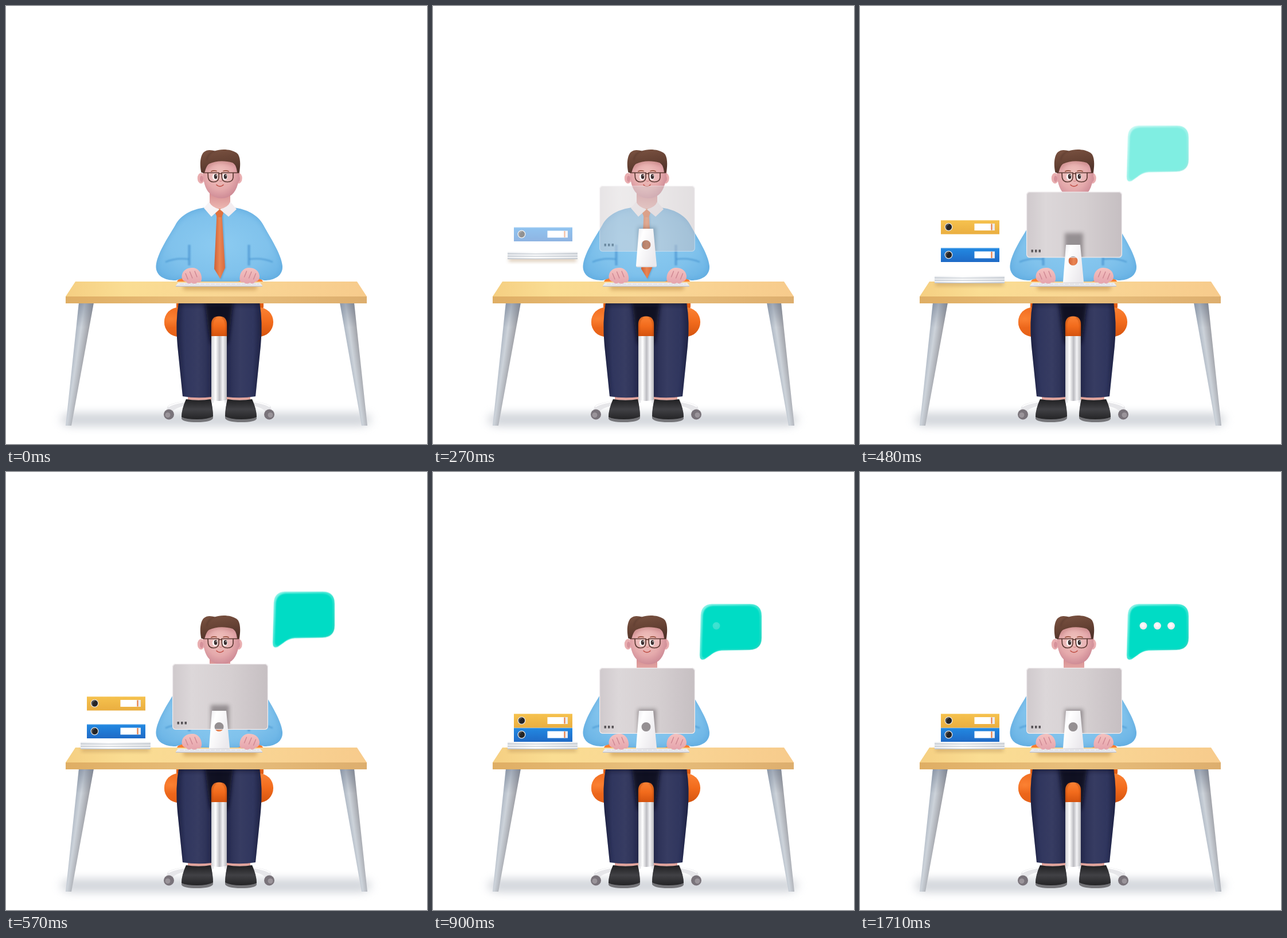
An HTML page that plays this animation: 734 by 763 pixels, repeating every 1740 ms.

```html
<!DOCTYPE html>
<html lang="en">
<head>
<meta charset="utf-8">
<title>Desk</title>
<style>
  html, body { margin: 0; width: 100%; height: 100%; overflow: hidden; background: #fff; }
  svg { display: block; width: 734px; height: 763px; }
  .show { opacity: 0; }
</style>
</head>
<body>
<svg viewBox="0 0 734 763" xmlns="http://www.w3.org/2000/svg">
  <defs>
    <filter id="b1" x="-50%" y="-50%" width="200%" height="200%"><feGaussianBlur stdDeviation="1.2"/></filter>
    <filter id="b3" x="-50%" y="-80%" width="200%" height="260%"><feGaussianBlur stdDeviation="3"/></filter>
    <filter id="b8" x="-20%" y="-150%" width="140%" height="400%"><feGaussianBlur stdDeviation="9 7"/></filter>

    <linearGradient id="wood"><stop offset="0" stop-color="#f5cf82"/><stop offset=".2" stop-color="#fadd93"/><stop offset=".6" stop-color="#f9d594"/><stop offset="1" stop-color="#f7cb8c"/></linearGradient>
    <linearGradient id="edge"><stop offset="0" stop-color="#dfae64"/><stop offset=".5" stop-color="#e8bf7c"/><stop offset="1" stop-color="#ddae6e"/></linearGradient>
    <linearGradient id="steelL" gradientUnits="userSpaceOnUse" x1="127" y1="518" x2="152.200" y2="521.700"><stop offset="0" stop-color="#aab4c1"/><stop offset=".4" stop-color="#cdd3da"/><stop offset="1" stop-color="#9a9ba1"/></linearGradient>
    <linearGradient id="steelR" gradientUnits="userSpaceOnUse" x1="582" y1="518" x2="606.500" y2="514.500"><stop offset="0" stop-color="#aab4c1"/><stop offset=".4" stop-color="#cdd3da"/><stop offset="1" stop-color="#9a9ba1"/></linearGradient>
    <linearGradient id="legShade" x2="0" y2="1"><stop offset="0" stop-color="#59677e" stop-opacity=".4"/><stop offset=".2" stop-color="#59677e" stop-opacity="0"/></linearGradient>
    <linearGradient id="pole"><stop offset="0" stop-color="#c9c9cd"/><stop offset=".3" stop-color="#fff"/><stop offset=".55" stop-color="#bcbcc1"/><stop offset=".75" stop-color="#f4f4f6"/><stop offset="1" stop-color="#b5b5ba"/></linearGradient>
    <linearGradient id="seat" x2="0" y2="1"><stop offset="0" stop-color="#fb8234"/><stop offset=".5" stop-color="#f26b1c"/><stop offset="1" stop-color="#d4530f"/></linearGradient>
    <radialGradient id="lobe" cx=".12" cy=".4" r=".3"><stop offset="0" stop-color="#ff8c3e"/><stop offset="1" stop-color="#f06a1e"/></radialGradient>
    <linearGradient id="navy"><stop offset="0" stop-color="#232749"/><stop offset=".2" stop-color="#30365e"/><stop offset=".5" stop-color="#373c62"/><stop offset=".75" stop-color="#2c3156"/><stop offset="1" stop-color="#1d2142"/></linearGradient>
    <linearGradient id="shoe" x2="0" y2="1"><stop offset="0" stop-color="#1f1f21"/><stop offset=".5" stop-color="#414145"/><stop offset="1" stop-color="#242426"/></linearGradient>
    <radialGradient id="shirt" cx=".5" cy=".5" r=".6"><stop offset="0" stop-color="#8ccbf1"/><stop offset=".65" stop-color="#80c2ec"/><stop offset="1" stop-color="#6cb5e6"/></radialGradient>
    <radialGradient id="skin" cx=".45" cy=".42" r=".62"><stop offset="0" stop-color="#f0c2bc"/><stop offset=".6" stop-color="#e5aaac"/><stop offset="1" stop-color="#cb8793"/></radialGradient>
    <linearGradient id="neck" x2="0" y2="1"><stop offset="0" stop-color="#d1858a"/><stop offset="1" stop-color="#f0bdb6"/></linearGradient>
    <linearGradient id="hand" x2="0" y2="1"><stop offset="0" stop-color="#f4c2c0"/><stop offset="1" stop-color="#e5a3ac"/></linearGradient>
    <linearGradient id="hair" x2=".3" y2="1"><stop offset="0" stop-color="#7b5342"/><stop offset=".6" stop-color="#664234"/><stop offset="1" stop-color="#52342b"/></linearGradient>
    <linearGradient id="tie"><stop offset="0" stop-color="#cf6136"/><stop offset=".5" stop-color="#e98553"/><stop offset="1" stop-color="#d96a3e"/></linearGradient>
    <linearGradient id="screen"><stop offset="0" stop-color="#cfc9cc"/><stop offset=".2" stop-color="#dcd7d9"/><stop offset=".6" stop-color="#d5cfd1"/><stop offset="1" stop-color="#c6bfc2"/></linearGradient>
    <linearGradient id="stand" x2="1" y2=".6"><stop offset="0" stop-color="#e9e8ec"/><stop offset=".3" stop-color="#fff"/><stop offset="1" stop-color="#ebe9ed"/></linearGradient>
    <linearGradient id="paper"><stop offset="0" stop-color="#d9dde3"/><stop offset=".4" stop-color="#f9fafb"/><stop offset="1" stop-color="#d4d8de"/></linearGradient>
    <linearGradient id="blue" x2="0" y2="1"><stop offset="0" stop-color="#2289e2"/><stop offset="1" stop-color="#1f6ac6"/></linearGradient>
    <linearGradient id="gold" x2="0" y2="1"><stop offset="0" stop-color="#f6c24e"/><stop offset="1" stop-color="#eaae40"/></linearGradient>
    <linearGradient id="label"><stop offset="0" stop-color="#fff"/><stop offset=".7" stop-color="#fff"/><stop offset="1" stop-color="#e6e6ea"/></linearGradient>
    <linearGradient id="rim" x2="1" y2="1"><stop offset="0" stop-color="#8df3e8"/><stop offset=".5" stop-color="#3ce6d3"/><stop offset="1" stop-color="#15cdb9"/></linearGradient>
    <radialGradient id="pearl" cx=".45" cy=".4" r=".6"><stop offset="0" stop-color="#fff"/><stop offset="1" stop-color="#ebe4ea"/></radialGradient>

    <path id="talk" d="M486 230H552Q573 230 573 251V289Q573 309 552 310L503 311C494 312 489 315 484 319L474 326Q465 330 465 319L467 249Q468 231 486 230Z"/>
    <path id="torso" d="M347 351C325 354 305 363 295 382C282 404 263 432 261.500 453C261 470 276 478 296 478L314 472L340 480H404L430 472L450 478C468 478 483 470 482 453C480 432 461 404 449 382C439 363 419 354 397 351Z"/>
    <path id="face" d="M344 283C343 299 345 313 352 323C359 332 367 335 376 335C390 335 400 326 404 311C407 300 408 290 407 280L398 262H351Z"/>
    <path id="trouser" d="M301 517H372V541Q358 543 358 565V681Q333 684 308 680L299 592Q295 550 301 517Z"/>
    <clipPath id="inTalk"><use href="#talk"/></clipPath>
    <clipPath id="inTorso"><use href="#torso"/></clipPath>
    <clipPath id="inFace"><use href="#face"/></clipPath>
    <clipPath id="inTrouser"><use href="#trouser"/></clipPath>
    <clipPath id="inScreen"><rect x="290" y="341" width="167" height="115" rx="6"/></clipPath>
    <clipPath id="inLap"><path d="M301 517H443L447 550L446 600H385V575H358V600H297V550Z"/></clipPath>

    <g id="binder">
      <rect x="141" width="102" height="24.500"/>
      <path d="M141 .5H243" stroke="#fff" stroke-opacity=".3"/>
      <circle cx="154.500" cy="12" r="6.300" fill="#242426" stroke="#e4e2de" stroke-width="1.300"/>
      <path d="M151 15A5 5 0 0 1 155 7.500" fill="none" stroke="#5d5d60" stroke-width="1.400"/>
      <rect x="199.500" y="6" width="35.500" height="12" fill="url(#label)"/>
      <path d="M229.500 6.500V17.500" stroke="#e8763a" stroke-width="2"/>
    </g>
  </defs>

  <rect x="98" y="708" width="536" height="25" rx="12" fill="#cbcfd5" opacity=".8" filter="url(#b8)"/>

  <!-- chair -->
  <g id="caster">
    <path d="M362 676L358 684C322 686 290 690 282 697L279 706H291C300 695 330 694 362 691Z" fill="#e6e6e9"/>
    <path d="M360 684C322 687 292 691 283 698" fill="none" stroke="#fff" stroke-width="2"/>
    <circle cx="284" cy="711.500" r="9" fill="#79737a"/>
    <circle cx="282" cy="712.500" r="4.500" fill="#9a949a"/>
  </g>
  <use href="#caster" transform="translate(743) scale(-1 1)"/>
  <rect x="297" y="473" width="152" height="62" rx="12" fill="url(#seat)"/>
  <rect x="276" y="525" width="190" height="51" rx="25" fill="url(#seat)"/>
  <rect x="276" y="525" width="95" height="51" rx="25" fill="url(#lobe)" opacity=".6"/>
  <path d="M357 572H385V686Q371 690 357 686Z" fill="url(#pole)"/>

  <!-- legs and shoes -->
  <g id="leg">
    <path d="M317 678H358V690H317Z" fill="#e2a49c"/>
    <path d="M306 719Q306 704 314 685Q336 688 357 685Q361 703 361 718Q358 725 333 725Q309 725 306 719Z" fill="#747478"/>
    <path d="M306 716Q306 702 314 685Q336 689 357 685Q361 702 361 715Q352 720 333 720Q314 720 306 716Z" fill="url(#shoe)"/>
    <use href="#trouser" fill="url(#navy)"/>
    <g clip-path="url(#inTrouser)">
      <path d="M301 517Q295 550 299 592L308 680M358 682V565" fill="none" stroke="#161a3a" stroke-width="5" opacity=".5" filter="url(#b3)"/>
    </g>
  </g>
  <use href="#leg" transform="translate(743) scale(-1 1)"/>
  <g clip-path="url(#inLap)">
    <path d="M346 512H397Q394 530 391 560L386 588H357L352 560Q349 530 346 512Z" fill="#0c0d1c" opacity=".85" filter="url(#b3)"/>
    <rect x="297" y="511" width="150" height="11" fill="#12132a" opacity=".5" filter="url(#b3)"/>
  </g>
  <path d="M358 575V555Q358 540.500 371.500 540.500T385 555V575Z" fill="url(#seat)"/>
  <path d="M359 575V556Q360 545 366 542M384 575V556Q383 545 377 542" fill="none" stroke="#a33c08" stroke-width="2" opacity=".55" filter="url(#b1)"/>

  <!-- desk legs -->
  <path d="M127 517H153L114 731H104Z" fill="url(#steelL)"/>
  <path d="M582 517H607L630 731H620Z" fill="url(#steelR)"/>
  <path d="M127 517H153L114 731H104ZM582 517H607L630 731H620Z" fill="url(#legShade)"/>

  <!-- person -->
  <use href="#torso" fill="url(#shirt)"/>
  <g clip-path="url(#inTorso)">
    <use href="#torso" fill="none" stroke="#4c97d2" stroke-width="4" opacity=".35" filter="url(#b3)"/>
    <g id="crease" fill="none" stroke="#3f8dcc" filter="url(#b1)">
      <path d="M319.500 416V452" stroke-width="4.500" opacity=".55"/>
      <path d="M278 446Q296 438 319 441" stroke-width="3" opacity=".5"/>
    </g>
    <use href="#crease" transform="translate(743) scale(-1 1)"/>
  </g>
  <path d="M355 320H391V347L373 357L355 347Z" fill="url(#neck)"/>
  <path d="M367 362H377L382 455L373.500 476L363 457Z" fill="#33709f" opacity=".3" filter="url(#b1)" transform="translate(1.500 1)"/>
  <path d="M367.500 363H376.500L382 456L373.500 475L363 458Z" fill="url(#tie)"/>
  <path d="M365 361L370 353H376L379 361L376 368H368Z" fill="#e0713f"/>
  <path d="M354 341L345 352L358 367L372.500 354Q359 351 354 341Z" fill="#f8f4f6"/>
  <path d="M391 341L402 354L388 367L372.500 354Q387 351 391 341Z" fill="#f3edf0"/>

  <ellipse cx="340" cy="300" rx="6.200" ry="9.300" fill="#e9aeb0"/>
  <ellipse cx="341" cy="301" rx="3" ry="5.500" fill="#d6929b"/>
  <ellipse cx="405.500" cy="300" rx="6.200" ry="9.300" fill="#e9aeb0"/>
  <ellipse cx="405" cy="301" rx="3" ry="5.500" fill="#d6929b"/>
  <use href="#face" fill="url(#skin)"/>
  <path d="M348 284Q352 275 364 271T398 275" fill="none" stroke="#a9635f" stroke-width="6" opacity=".45" filter="url(#b3)" clip-path="url(#inFace)"/>
  <path d="M340.500 290C337 275 339 260 345 254.500C351 249 359 251 364 252.500C377 247.500 399 250 405 259C409 266 409 279 406.500 291L403 290C402 281 400 276 395 273C382 269 366 269 354 275C349 279 348 285 346 291Z" fill="url(#hair)"/>
  <path d="M350 268C352 258 358 254 365 253" fill="none" stroke="#4c3027" stroke-width="2" opacity=".4" filter="url(#b1)"/>
  <path d="M358 288Q362 286 367 287.500M379 287.500Q384 286 388 288" fill="none" stroke="#9a5440" stroke-width="1.800" stroke-linecap="round"/>
  <g fill="#fff" fill-opacity=".9">
    <ellipse cx="364.500" cy="297.500" rx="4.600" ry="5.600"/>
    <ellipse cx="381.500" cy="297.500" rx="4.600" ry="5.600"/>
  </g>
  <g fill="#241819">
    <ellipse cx="365.500" cy="297" rx="2.800" ry="4.200"/>
    <ellipse cx="382.500" cy="297" rx="2.800" ry="4.200"/>
  </g>
  <circle cx="366.500" cy="295.300" r=".9" fill="#fff"/><circle cx="383.500" cy="295.300" r=".9" fill="#fff"/>
  <g fill="#fff" fill-opacity=".1" stroke="#5c3933" stroke-width="1.700">
    <path d="M352 290.500H371V299Q370 306.500 362 306.500T352.500 299Z"/>
    <path d="M376 290.500H396V299Q395 306.500 386 306.500T376.500 299Z"/>
    <path d="M343 290.500H352M371 292.500Q373.500 291 376 292.500M396 290.500H406" fill="none"/>
  </g>
  <path d="M371.500 304Q374 307.500 377 304" fill="#e5a0a0" stroke="#d18789"/>
  <path d="M367 311.500Q373 317 379 311.500" fill="none" stroke="#bd4a3f" stroke-width="1.600" stroke-linecap="round"/>

  <!-- desk top -->
  <path d="M121 480H612L629 506H104Z" fill="url(#wood)"/>
  <path d="M104 506H629V518H104Z" fill="url(#edge)"/>
  <rect x="308" y="484" width="130" height="11" rx="5" fill="#b5803a" opacity=".45" filter="url(#b3)"/>
  <path d="M300 482H443L447 487V489H296V487Z" fill="#ececef"/>
  <path d="M296 488.300H447" stroke="#c2c1c7" stroke-width="1.500"/>
  <path d="M303 484.500H441" stroke="#d9d8dd" stroke-dasharray="7 2"/>
  <g id="fist">
    <path d="M306.500 470C308 460 316 456 325 456C334 456 340 463 341 472C342 480 338 483 334 481C331 485 326 484 323 482C320 485 315 483 314 480C309 480 306 475 306.500 470Z" fill="url(#hand)"/>
    <path d="M313 466L317 476M320.500 463L325 474M329 462L333 472" fill="none" stroke="#cc8490" stroke-width="1.300" stroke-linecap="round"/>
  </g>
  <use href="#fist" transform="translate(748.500) scale(-1 1)"/>

  <!-- arriving things -->
  <g class="show" id="papers">
    <rect x="132" y="481" width="118" height="6" fill="#a87c4a" opacity=".45" filter="url(#b3)"/>
    <rect x="130" y="470.500" width="122" height="12.500" fill="url(#paper)"/>
    <path d="M130 471H252M130 475.500H252M130 479.500H252" stroke="#fff"/>
    <path d="M130 474H252M130 478H252M130 482.500H252" stroke="#b9c0c8"/>
  </g>
  <g class="show" id="low"><use href="#binder" y="445.500" fill="url(#blue)"/></g>
  <g class="show" id="high"><use href="#binder" y="421" fill="url(#gold)"/></g>

  <g class="show" id="monitor">
    <rect x="290" y="341" width="167" height="115" rx="6" fill="url(#screen)"/>
    <g clip-path="url(#inScreen)">
      <rect x="357" y="413" width="32" height="52" fill="#6b6568" opacity=".6" filter="url(#b3)"/>
      <rect x="290" y="341" width="167" height="115" rx="6" fill="none" stroke="#efebed" stroke-width="2.500"/>
    </g>
    <path d="M298.500 442H302V446.500H298.500ZM305 442H308.500V446.500H305ZM311.500 442H315V446.500H311.500Z" fill="#575357"/>
  </g>
  <g class="show" id="foot">
    <path d="M359 416H384L390 480Q390 483 387 483H357Q354 483 354 480ZM363.500 444a8 8 0 1 0 16 0a8 8 0 1 0 -16 0Z" fill="url(#stand)" fill-rule="evenodd"/>
    <path d="M355 482H389" stroke="#cfcdd2"/>
  </g>

  <g class="show" id="bubble">
    <use href="#talk" fill="url(#rim)"/>
    <g clip-path="url(#inTalk)">
      <use href="#talk" fill="#05dcc5" filter="url(#b1)" transform="translate(31.300 16.800) scale(.94)"/>
    </g>
    <use href="#talk" fill="none" stroke="#a5f3ea" stroke-width=".8" opacity=".7"/>
  </g>
  <g fill="url(#pearl)">
    <circle class="show" id="dot1" cx="494" cy="268" r="6.500"/>
    <circle class="show" id="dot2" cx="518.500" cy="268" r="6.500"/>
    <circle class="show" id="dot3" cx="542.500" cy="268" r="6.500"/>
  </g>
</svg>
<script>
  const LOOP = 1740, TICK = 30;

  // id, fade start, fade end, move start, move end, rise in px
  const parts = [
    ['papers', 90, 210, 180, 480, 60],
    ['foot', 90, 210, 180, 480, 40],
    ['low', 210, 330, 300, 600, 60],
    ['high', 330, 450, 420, 720, 60],
    ['monitor', 180, 360, 390, 630, 28],
    ['bubble', 390, 570, 570, 750, 21.5],
    ['dot1', 870, 990],
    ['dot2', 1230, 1350],
    ['dot3', 1590, 1710]
  ];

  // Holds `a`, goes to `b` in even ticks, then holds `b`.
  function run(id, prop, from, to, a, b) {
    const key = (at, value, easing = 'linear') => ({ [prop]: value, offset: at / LOOP, easing });
    document.getElementById(id).animate([
      key(0, a),
      key(from, a, `steps(${(to - from) / TICK}, end)`),
      key(to, b),
      key(LOOP, b)
    ], { duration: LOOP, iterations: Infinity });
  }

  for (const [id, in0, in1, go, stop, rise] of parts) {
    run(id, 'opacity', in0, in1, 0, 1);
    if (rise) run(id, 'transform', go, stop, `translateY(${-rise}px)`, 'translateY(0px)');
  }
</script>
</body>
</html>
```
